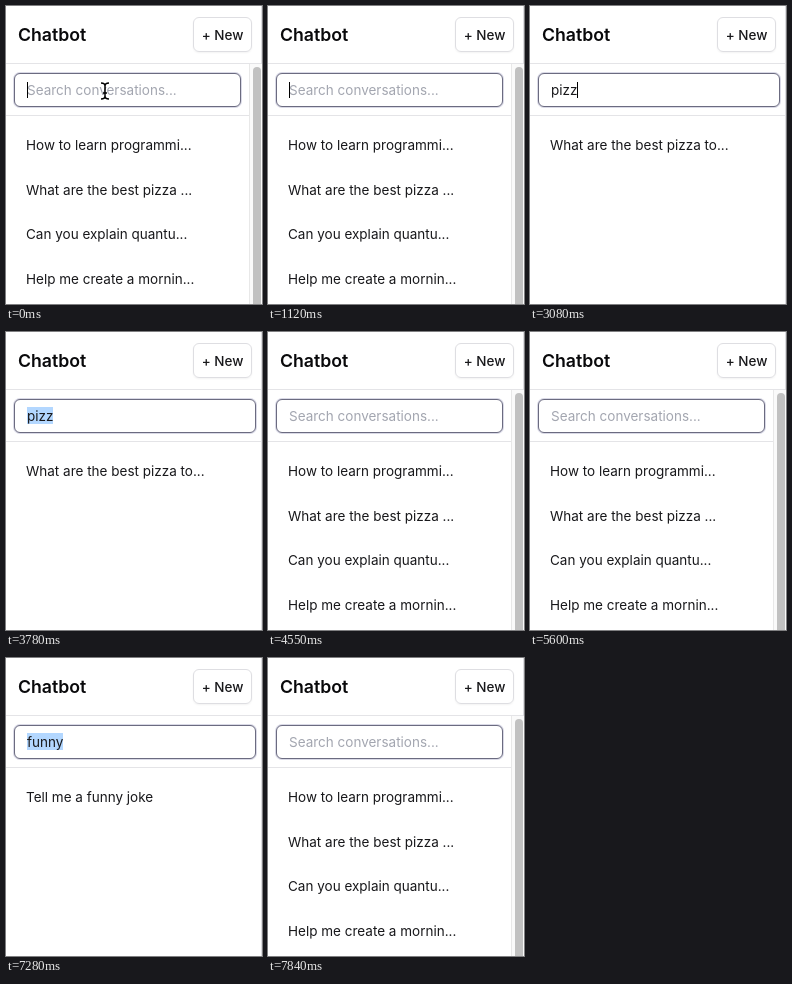
Write an HTML page that moves like this. It is 256 px wide and 298 px high and loops after 8 s.

```html
<!DOCTYPE html>
<html lang="en">
<head>
<meta charset="utf-8">
<title>Chatbot search</title>
<style>
  html, body { margin: 0; width: 100%; height: 100%; overflow: hidden; background: #fff; }
  body { position: relative; font: 400 13.5px/20px Inter, sans-serif; color: #18181b; white-space: nowrap; }
  body * { position: absolute; box-sizing: border-box; }
  .title { left: 12px; top: 17px; font-size: 17.7px; line-height: 24px; font-weight: 600; color: #09090b; }
  .new { left: 187px; top: 11px; width: 59px; height: 35px; border: 1px solid #dedee2; border-radius: 6px;
    box-shadow: 0 1px 2px #0000000d; text-align: center; line-height: 34px; font-weight: 500; }
  .rule { left: 0; width: 256px; height: 1px; background: #e4e4e7; }
  .edge { right: 0; top: 0; width: 1px; height: 100%; background: #dcdce0; }
  .field { left: 8px; top: 66.5px; width: 242px; height: 34.5px; border: 1px solid #6b6b80; border-radius: 6px;
    box-shadow: 0 0 0 1px #d9d9e6; background: #fff; }
  .hint, .typed { left: 21px; top: 74px; }
  .hint { color: #a3a6b0; }
  .typed { height: 20px; }
  .typed span { position: relative; }
  .mark { left: 0; top: 1px; width: 100%; height: 17px; background: #b3d7ff; }
  .caret { left: 100%; top: 2px; width: 1px; height: 16px; background: #000; }
  #items { left: 20px; top: 129px; }
  .item { left: 0; }
  .track { left: 243px; top: 58px; width: 13px; height: 240px; background: #fafafa; border-left: 1px solid #e8e8e8; }
  .thumb { left: 3px; top: 3px; width: 8px; height: 260px; border-radius: 4px; background: #c1c1c1; }
  .list .field { width: 227px; }
  .list .low { width: 243px; }
  body:not(.list) .track { display: none; }
  .pointer { left: 0; top: 0; overflow: visible; }
</style>
</head>
<body class="list">
<div class="title">Chatbot</div>
<div class="new">+ New</div>
<div class="rule" style="top:57px"></div>
<div class="rule low" style="top:109px"></div>
<div class="edge"></div>
<div class="field"></div>
<div class="hint">Search conversations...</div>
<div class="typed"><i class="mark"></i><span></span><i class="caret"></i></div>
<div id="items"></div>
<div class="track"><div class="thumb"></div></div>
<svg class="pointer" width="10" height="18">
  <g fill="none">
    <path id="beam" d="M-4-8Q0-8 0-5Q0-8 4-8M0-5V5M-4 8Q0 8 0 5Q0 8 4 8M-2 2H2" stroke="#000" stroke-width="1.5"/>
    <path id="arrow" d="M0 0V14L3.3 11L5.5 16L8 15L5.8 10H10Z" fill="#000" stroke="#fff"/>
  </g>
</svg>
<script>
  const LOOP = 8000;
  const $ = s => document.querySelector(s);
  const chats = ['How to learn programmi...', 'What are the best pizza ...', 'Can you explain quantu...', 'Help me create a mornin...'];
  const wide = ['How to learn programming...', 'What are the best pizza to...', 'Can you explain quantum ...', 'Help me create a morning...'];
  const pizza = [wide[1]], joke = ['Tell me a funny joke'];

  // start time, query, caret on, selected, results
  const steps = [
    [0, '', 1, 0, chats], [420, '', 0, 0, chats], [910, '', 1, 0, chats],
    [1400, '', 0, 0, chats], [1960, '', 1, 0, chats], [2450, '', 0, 0, chats],
    [2520, 'p', 1, 0, wide], [2730, 'pi', 1, 0, pizza], [2870, 'piz', 1, 0, pizza],
    [3080, 'pizz', 1, 0, pizza], [3570, 'pizz', 0, 0, pizza], [3640, 'pizz', 0, 1, pizza],
    [3990, '', 1, 0, chats], [4550, '', 0, 0, chats], [5040, '', 1, 0, chats], [5600, '', 0, 0, chats],
    [5740, 'f', 1, 0, joke], [5880, 'fu', 1, 0, joke], [5950, 'fun', 1, 0, joke],
    [6020, 'funn', 1, 0, joke], [6090, 'funny', 1, 0, joke], [6580, 'funny', 0, 0, joke],
    [7140, 'funny', 1, 0, joke], [7210, 'funny', 0, 1, joke],
    [7350, '', 1, 0, chats], [7840, '', 0, 0, chats]
  ];

  const show = (el, on) => el.style.visibility = on ? 'visible' : 'hidden';
  let shown;

  function render([, query, caret, selected, results]) {
    document.body.classList.toggle('list', results === chats);
    $('.typed span').textContent = query;
    show($('.hint'), !query);
    show($('.caret'), caret);
    show($('.mark'), selected);
    $('#items').innerHTML = results
      .map((text, i) => `<div class="item" style="top:${i * 44.5}px">${text}</div>`).join('');
  }

  function movePointer(t) {
    const p = Math.min(1, Math.max(0, t / 420));
    const ease = p * p * (3 - 2 * p);
    const x = 99 + 175 * ease, y = 85 - 20 * ease;
    $('.pointer g').setAttribute('transform', `translate(${x} ${y})`);
    show($('#beam'), p < 1 && x < 235);
    show($('#arrow'), p < 1 && x >= 235);
  }

  function frame(now) {
    const t = now % LOOP;
    const step = steps.findLast(s => s[0] <= t);
    if (step !== shown) render(shown = step);
    movePointer(t);
    requestAnimationFrame(frame);
  }
  frame(0);
</script>
</body>
</html>
```
